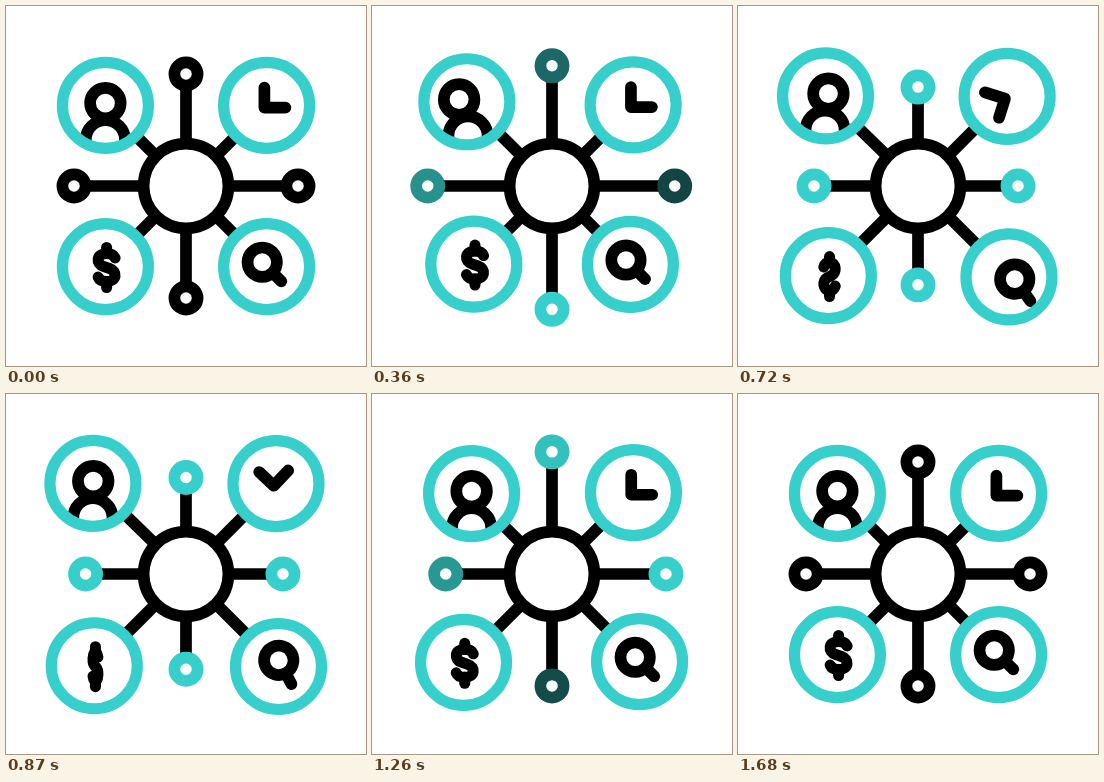
Write an HTML page with a canvas that moves like this. It is 360x360 px and loops after 1800 ms.

```html
<!DOCTYPE html>
<html lang="en">
<head>
<meta charset="utf-8">
<title>Network hub</title>
<style>
html, body { margin: 0; width: 100%; height: 100%; overflow: hidden; background: #fff; }
canvas { display: block; width: 360px; height: 360px; }
</style>
</head>
<body>
<canvas id="stage"></canvas>
<script>
const SIZE = 360, LOOP = 1800, STEP = 30, END = 1680;
const TEAL = [55, 207, 203];
const MID = 180, WIDTH = 11.7;
const canvas = document.getElementById('stage');
const ctx = canvas.getContext('2d');
const scale = window.devicePixelRatio || 1;
canvas.width = canvas.height = SIZE * scale;

const clamp = v => Math.max(0, Math.min(1, v));
const ramp = (t, from, to) => clamp((t - from) / (to - from));
const smooth = u => u * u * (3 - 2 * u);
const mix = (a, b, u) => a + (b - a) * u;
const tint = u => `rgb(${TEAL.map(c => Math.round(c * u)).join(',')})`;

// cubic-bezier(.25, 0, .25, 1)
function glide(u) {
  let lo = 0, hi = 1;
  for (let i = 0; i < 20; i++) {
    const s = (lo + hi) / 2;
    if (0.75 * s * (1 - s) + s * s * s < u) lo = s; else hi = s;
  }
  return smooth(lo);
}

// Wind up to `a`, travel to `b`, swing back past rest to `a`, settle.
function travel(t, { a, b, go, back }) {
  const start = 270 + go;
  if (t < start) return a * smooth(ramp(t, 0, start));
  const r = t - back;
  if (r < 1120) return mix(a, b, glide(ramp(t, start, start + 750)));
  if (r < 1290) return mix(b, a, smooth(ramp(r, 1120, 1290)));
  return a * (1 - smooth(ramp(r, 1290, 1430)));
}

const nodes = [
  { x: 0, y: -1, a: 12.5, b: -16, go: -25, back: 0, fade: 285 },
  { x: -1, y: 0, a: 12.5, b: -13, go: 60, back: 80, fade: 255 },
  { x: 1, y: 0, a: 12.5, b: -16, go: 15, back: 40, fade: 310 },
  { x: 0, y: 1, a: 12.5, b: -18, go: 30, back: 45, fade: 200 }
];

const bubbles = [
  { x: -1, y: -1, ky: 0.8, a: -0.5, b: 12.5, go: -105, back: -112, icon: user },
  { x: 1, y: -1, ky: 1.05, a: -2, b: 9.5, go: -50, back: 25, icon: clock },
  { x: -1, y: 1, ky: 1, a: -2.5, b: 12, go: 65, back: 80, icon: dollar },
  { x: 1, y: 1, ky: 1, a: -4, b: 12.3, go: -8, back: 75, icon: search }
];

function ring(x, y, r, color, fill) {
  ctx.beginPath();
  ctx.arc(x, y, r, 0, Math.PI * 2);
  if (fill) {
    ctx.fillStyle = '#fff';
    ctx.fill();
  }
  ctx.strokeStyle = color;
  ctx.stroke();
}

function line(...p) {
  ctx.beginPath();
  for (let i = 0; i < p.length; i += 2) ctx.lineTo(p[i], p[i + 1]);
  ctx.strokeStyle = '#000';
  ctx.stroke();
}

const swayKeys = [[200, 0], [350, -7.8], [590, 4.8], [880, 0.3], [960, 0]];
function sway(t) {
  for (let i = 1; i < swayKeys.length; i++) {
    const [t0, v0] = swayKeys[i - 1], [t1, v1] = swayKeys[i];
    if (t < t1) return mix(v0, v1, smooth(ramp(t, t0, t1)));
  }
  return 0;
}

function user(t) {
  const s = sway(t);
  ring(s, -2.3, 15.3, '#000', false);
  ring(-0.15 * s, 34.3, 19.6, '#000', true);
}

const turn = (t, from, to) => Math.PI * 2 * smooth(ramp(t, from, to));

function clock(t) {
  ctx.translate(-2.2, 2.2);
  ctx.rotate(turn(t, 390, 1010));
  line(0, -20, 0, 0, 21, 0);
}

function dollar(t) {
  const k = Math.cos(turn(t, 515, 1015));
  ctx.translate(1.2, 0.9);
  ctx.lineWidth = 11;
  line(0, -20, 0, -14);
  line(0, 14, 0, 20);
  ctx.beginPath();
  ctx.moveTo(8.5 * k, -9.5);
  ctx.bezierCurveTo(7 * k, -13, 4 * k, -14, 0, -14);
  ctx.bezierCurveTo(-10.5 * k, -14, -11 * k, -3.5, -3 * k, -1);
  ctx.lineTo(3 * k, 1);
  ctx.bezierCurveTo(11 * k, 3.5, 10.5 * k, 14, 0, 14);
  ctx.bezierCurveTo(-4 * k, 14, -7 * k, 13, -8.5 * k, 9.5);
  ctx.stroke();
}

function search(t) {
  const p = turn(t, 360, 1020);
  const orbit = Math.PI * 1.25 - p;
  ctx.translate(6.2 * Math.cos(orbit), 6.2 * Math.sin(orbit));
  ctx.rotate(Math.PI / 4 - 0.4 * Math.sin(p));
  ring(0, 0, 14.7, '#000', false);
  line(15, 0, 27, 0);
}

function drawNode(n, t) {
  const d = 112 + travel(t, n);
  const x = MID + n.x * d, y = MID + n.y * d;
  const on = ramp(t, n.fade, n.fade + 150) - ramp(t, n.fade + 965, n.fade + 1115);
  line(MID, MID, x, y);
  ring(x, y, 11.6, tint(on), true);
}

function drawBubble(b, t) {
  const d = travel(t, b);
  const x = MID + b.x * (80.6 + d), y = MID + b.y * (80.6 + d * b.ky);
  line(MID, MID, x, y);
  ctx.save();
  ctx.translate(x, y);
  ctx.beginPath();
  ctx.arc(0, 0, 43, 0, Math.PI * 2);
  ctx.fillStyle = '#fff';
  ctx.fill();
  ctx.save();
  ctx.clip();
  ctx.strokeStyle = '#000';
  b.icon(t);
  ctx.restore();
  ctx.lineWidth = 11.2;
  ring(0, 0, 43, tint(1), false);
  ctx.restore();
}

function draw(t) {
  ctx.setTransform(scale, 0, 0, scale, 0, 0);
  ctx.fillStyle = '#fff';
  ctx.fillRect(0, 0, SIZE, SIZE);
  ctx.lineWidth = WIDTH;
  ctx.lineCap = ctx.lineJoin = 'round';
  nodes.forEach(n => drawNode(n, t));
  bubbles.forEach(b => drawBubble(b, t));
  ring(MID, MID, 42.4, '#000', true);
}

const began = performance.now();
function tick() {
  const t = (performance.now() - began) % LOOP;
  draw(Math.min(END, Math.floor(t / STEP) * STEP));
  requestAnimationFrame(tick);
}
tick();
</script>
</body>
</html>
```
